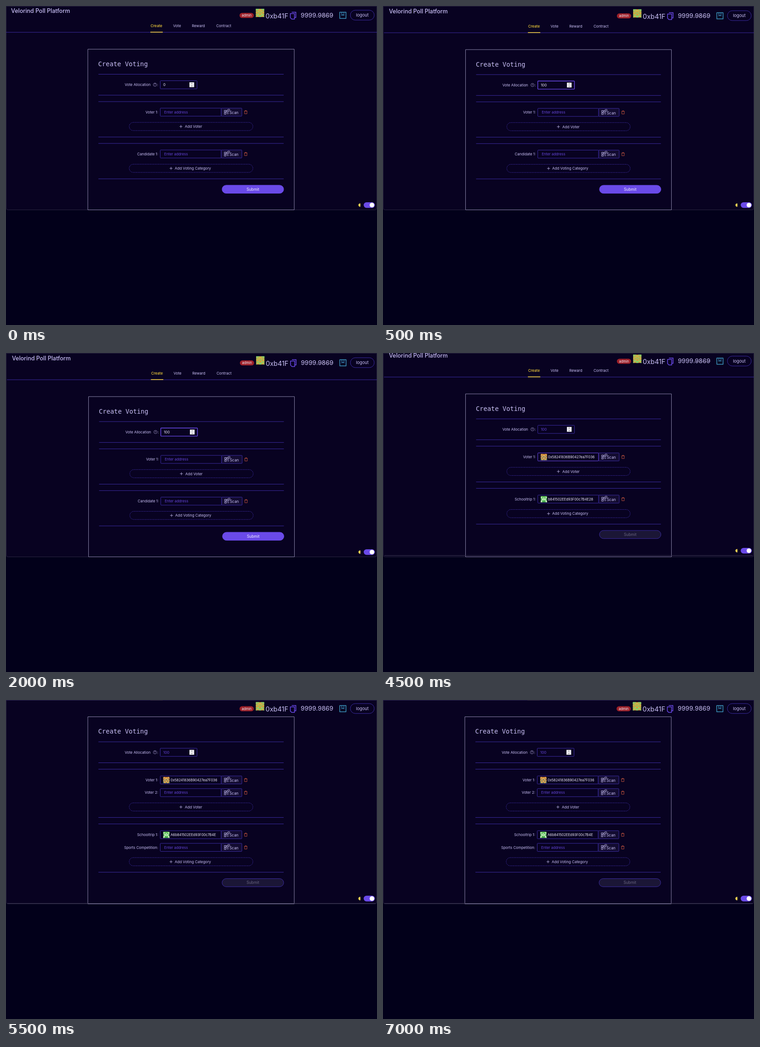
An HTML page for the animation above (8000 ms loop, 807 by 694 pixels).

```html
<!DOCTYPE html>
<html lang="en">
<head>
<meta charset="utf-8">
<title>Create Voting</title>
<style>
html, body { margin: 0; width: 100%; height: 100%; overflow: hidden; background: #02001a; }
svg { display: block; width: 807px; height: 694px; font-family: Inter, "Open Sans", sans-serif; }
.mono { font-family: "DejaVu Sans Mono", monospace; }
.scene { visibility: hidden; animation: 8s step-end infinite; }
#s0 { animation-name: first; }
#s1 { animation-name: second; }
#s2 { animation-name: third; }
#s3 { animation-name: fourth; }
@keyframes first { 0% { visibility: visible } 6.25%, 100% { visibility: hidden } }
@keyframes second { 0% { visibility: hidden } 6.25% { visibility: visible } 37.5%, 100% { visibility: hidden } }
@keyframes third { 0% { visibility: hidden } 37.5% { visibility: visible } 68.75%, 100% { visibility: hidden } }
@keyframes fourth { 0% { visibility: hidden } 68.75%, 100% { visibility: visible } }
</style>
</head>
<body>
<svg id="stage" viewBox="0 0 807 694"></svg>
<script>
const C = {
  win: '#080221', text: '#c9c0f5', line: '#3b2ca0', accent: '#6a4ae8', hint: '#6446d8',
  frame: '#8d88ac', white: '#f4f2ff', gold: '#f2cf3a', red: '#c4553f', teal: '#3f9fc6', dim: '#6a6680'
};

const rect = (x, y, w, h, fill, stroke = 'none', r = 0, extra = '') =>
  `<rect x="${x}" y="${y}" width="${w}" height="${h}" rx="${r}" fill="${fill}" stroke="${stroke}" ${extra}/>`;
const path = (d, stroke, w = 1, fill = 'none') =>
  `<path d="${d}" stroke="${stroke}" stroke-width="${w}" fill="${fill}"/>`;
const at = (x, y, body) => `<g transform="translate(${x} ${y})">${body}</g>`;
const rule = y => path(`M201 ${y}H604`, C.line);

// Text centred vertically on y.
const text = (s, x, y, size = 7.9, fill = C.text, anchor = 'start', extra = '') =>
  `<text x="${x}" y="${y + size * 0.36}" font-size="${size}" fill="${fill}" text-anchor="${anchor}" ${extra}>${s}</text>`;

// Mirrored block avatar; each row lists the left half as colour indexes.
function avatar(x, y, size, colors, rows) {
  const n = rows.length, c = size / n;
  let out = rect(x, y, size, size, colors[0]);
  rows.forEach((row, j) => [...row + [...row].reverse().join('')].forEach((v, i) => {
    if (v !== '0') out += rect(x + i * c, y + j * c, c + 0.1, c + 0.1, colors[v]);
  }));
  return out;
}
const adminPic = (x, y, s) => avatar(x, y, s, ['#d99a3c', '#7fd06a', '#b8c653'],
  ['1110', '1002', '0120', '2001', '0010', '1120', '0211', '1001']);
const voterPic = (x, y, s) => avatar(x, y, s, ['#d98a35', '#e8b763', '#4f8f8a'],
  ['0100', '1001', '0210', '0012', '1200', '0021', '2100', '2012']);
const choicePic = (x, y, s) => avatar(x, y, s, ['#62c95a', '#d8f0d2', '#2f8a4c'],
  ['0000', '1100', '0021', '0110', '2011', '0100', '1120', '1002']);

const trash = y => at(521.5, y, path('M-3.5 -2.3H3.5M-1.3 -2.5V-3.6H1.3V-2.5M-2.6 -2V3.5H2.6V-2', C.red, 0.9));

const scanIcon = y => at(479, y, [[-4, -4], [1, -4], [-4, 1]]
  .map(([x, v]) => rect(x, v, 3.4, 3.4, 'none', C.text, 0, 'stroke-width=".9"')).join('') +
  path('M1 1.5H2.5M3.5 1.5H5M2 3.5H5', C.text, 0.9) +
  rect(3.2, -6.6, 4.6, 3.8, C.win, C.text, 1, 'stroke-width=".7"') +
  '<circle cx="5.5" cy="-4.7" r=".8" fill="none" stroke="#c9c0f5" stroke-width=".5"/>');

function entry({ label, value, pic, focus }, y) {
  return text(label + ':', 331, y, 7.9, C.text, 'end') +
    rect(468, y - 8.8, 45, 17.5, '#130c31', C.line, 1) +
    rect(335.5, y - 8.8, 132.5, 17.5, C.win, focus ? C.accent : C.line, 1) +
    (value ? pic(342, y - 6.5, 13.5) + text(value, 358, y + 0.3, 7.4, C.white)
           : text('Enter address', 344, y, 7.9, C.hint)) +
    scanIcon(y) + text('Scan', 486, y + 1.2, 8.3) + trash(y);
}

function addButton(label, y, x, plus) {
  return rect(268, y - 9, 269, 17.8, 'none', C.line, 8.9, 'stroke-dasharray="2.2 1.4"') +
    path(`M${plus - 3.2} ${y}h6.4m-3.2 -3.2v6.4`, C.text, 0.8) + text(label, x, y, 8);
}

// Rows, then the add button; returns the markup and the y of the closing rule.
function section(rows, top, ...button) {
  let y = top + 23, out = rule(top);
  rows.forEach((r, i) => {
    if (i) y += 27.6;
    else if (r.value) y += 0.5;
    out += entry(r, y);
  });
  y += 31.2 + (rows.length === 1 && rows[0].value ? 0.5 : 0);
  const end = y + 22.8;
  return [out + addButton(button[0], y, button[1], button[2]) + rule(end), end];
}

function account(strike) {
  return rect(508, 15, 31, 11, '#9c2029', 'none', 5.5) +
    text('admin', 523.5, 20.4, 7.4, C.white, 'middle') +
    adminPic(543.5, 6, 18) +
    text('0xb41F', 564.5, 21.3, 14.5) +
    path('M621.5 13.5H630.5V25H627.5M618.5 16.5H627.5V28.5H621.5L618.5 25.5Z', C.accent, 1.5) +
    text('9999.9869', 641, 20, 13.6) +
    (strike ? path('M676 21H712', '#77718f', 0.8) : '') +
    rect(726, 13.5, 13.5, 13.5, 'none', C.teal, 0, 'stroke-width="1.4"') +
    path('M730.5 14V20.5L732.8 19L735 20.5V14', C.teal, 1.1) +
    rect(749, 9.2, 52, 21.5, 'none', C.line, 10.7) +
    text('logout', 775, 20, 9.3, C.text, 'middle');
}

function tabs() {
  return text('Velorind Poll Platform', 11, 10.2, 12.5, C.text, 'start', 'font-weight="500"') +
    [['Create', 327.3], ['Vote', 372], ['Reward', 418.5], ['Contract', 473.5]]
      .map(([s, x], i) => text(s, x, 43.5, 8, i ? C.text : C.gold, 'middle', i ? '' : 'font-weight="500"')).join('') +
    path('M0 57.2H807', C.line) + rect(314, 56, 27, 1.6, C.gold);
}

function allocation(value, color, focus) {
  return text('Vote Allocation', 258.3, 171.4, 7.9) +
    `<circle cx="324" cy="171.2" r="3.6" fill="none" stroke="${C.text}" stroke-width=".6"/>` +
    text('?', 324, 171.3, 5.5, C.text, 'middle') + text(':', 331, 171.4, 7.9, C.text, 'end') +
    rect(335.5, 162.5, 80, 17.7, C.win, focus ? C.accent : C.line, 1, focus ? 'stroke-width="1.4"' : '') +
    text(value, 342, 171.4, 7.9, color) +
    rect(399, 166, 10.3, 10.6, '#ececf0') +
    path('M402.7 169.8L404.2 168L405.7 169.8M402.7 172.8L404.2 174.6L405.7 172.8', '#55535e', 0.8);
}

function toggle(y) {
  return path(`M771 ${y - 3.6}A3.7 3.7 0 1 0 771 ${y + 3.6}A3 3 0 0 1 771 ${y + 1}V${y - 1}A3 3 0 0 1 771 ${y - 3.6}Z`, 'none', 0, '#f0cf52') +
    rect(778, y - 6.2, 24.3, 12.4, C.accent, 'none', 6.2) +
    `<circle cx="796" cy="${y}" r="5" fill="#fff"/>`;
}

function scene(o, i) {
  const shift = o.panel - 94;
  const [voters, a] = section(o.voters, o.panel + 114, 'Add Voter', 389, 380.5);
  const [choices, b] = section(o.choices, a + 14, 'Add Voting Category', 367, 359);
  const submitY = b + 13.9;
  const ready = !o.voters[0].value;
  return `<g id="s${i}" class="scene">` +
    path('M0.5 0.5H806.5V439.5Q806.5 443.5 802.5 443.5H4.5Q0.5 443.5 0.5 439.5Z', '#292640', 1, C.win) +
    `<g transform="${o.zoom ? 'matrix(.9975 0 0 .9975 2 1.1)' : 'translate(0 0)'}">` +
    at(0, shift, tabs() + allocation(o.amount, o.amountColor, o.amountFocus) +
      text('Create Voting', 200.5, 125.8, 13.8, C.text, 'start', 'class="mono"') + rule(148.5) + rule(194)) +
    at(0, o.head, account(i < 3)) +
    path(`M178 443.5V${o.panel}H627V443.5Z`, C.frame) +
    voters + choices +
    rect(470, submitY, 134, 17.6, ready ? C.accent : '#1b1636', ready ? C.accent : C.line, 8.8) +
    text('Submit', 537, submitY + 8.8, 8.4, ready ? C.white : C.dim, 'middle') +
    toggle(o.edge - 10.4) +
    '</g>' +
    (o.edge < 443 ? path(`M3 ${o.edge}H804`, '#3a3652', 1) : '') +
    '</g>';
}

const blankVoter = { label: 'Voter 1' };
const blankChoice = { label: 'Candidate 1' };
const voter = { label: 'Voter 1', value: '0x58241836B90427ea7F036', pic: voterPic };
const trip = { label: 'Schooltrip 1', pic: choicePic };

const scenes = [
  { panel: 94, head: 0, edge: 443.5, amount: '0', amountColor: C.white,
    voters: [blankVoter], choices: [blankChoice] },
  { zoom: true, panel: 94, head: 0, edge: 443.5, amount: '100', amountColor: C.white, amountFocus: true,
    voters: [blankVoter], choices: [blankChoice] },
  { zoom: true, panel: 88.1, head: -3.5, edge: 440.5, amount: '100', amountColor: C.hint,
    voters: [{ ...voter, focus: true }], choices: [{ ...trip, value: 'b841502EEd93F00c7B4E28' }] },
  { panel: 36.5, head: -1.4, edge: 442.4, amount: '100', amountColor: C.hint,
    voters: [voter, { label: 'Voter 2' }],
    choices: [{ ...trip, value: 'A6b841502EEd93F00c7B4E' }, { label: 'Sports Competition' }] }
];

document.getElementById('stage').innerHTML = scenes.map(scene).join('');
</script>
</body>
</html>
```
